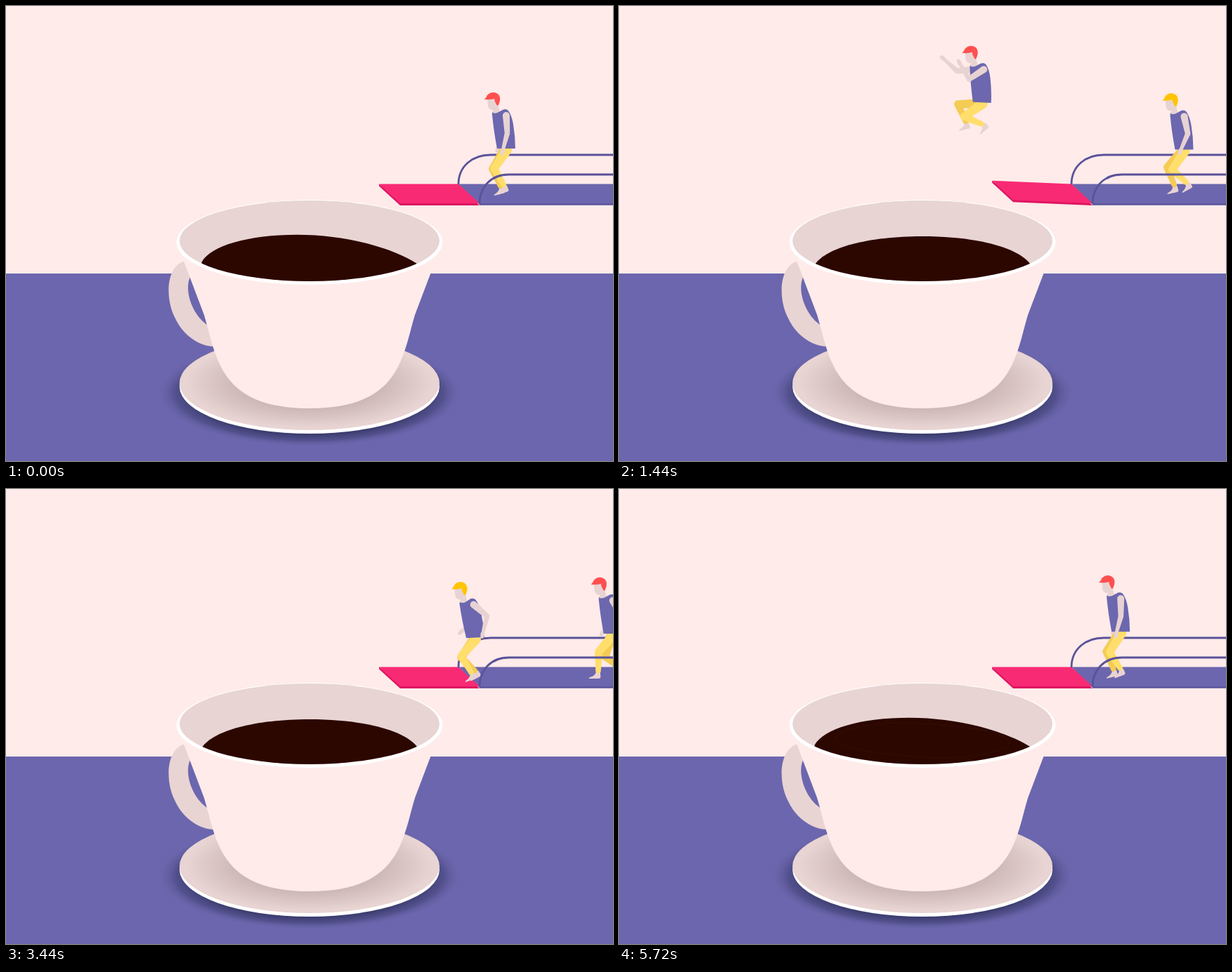
Recreate the animation shown at these times as an HTML page. Size 864 px wide and 648 px high, loop 5.76 s.

```html
<!DOCTYPE html>
<html lang="en">
<head>
<meta charset="utf-8">
<title>Coffee dive</title>
<style>
html, body { margin: 0; width: 100%; height: 100%; overflow: hidden; background: #feebea; }
svg { display: block; width: 100%; height: 100%; }
</style>
</head>
<body>
<svg viewBox="0 0 864 648" xmlns="http://www.w3.org/2000/svg">
  <defs>
    <radialGradient id="shade">
      <stop offset="0.78" stop-color="#3d3e70"/>
      <stop offset="0.88" stop-color="#4b4a83" stop-opacity="0.75"/>
      <stop offset="1" stop-color="#6c66ae" stop-opacity="0"/>
    </radialGradient>
    <radialGradient id="plate">
      <stop offset="0.55" stop-color="#cdb7b7"/>
      <stop offset="0.95" stop-color="#e8d4d3"/>
    </radialGradient>
    <clipPath id="inside"><ellipse cx="432" cy="334.5" rx="185" ry="57.5"/></clipPath>
    <clipPath id="dry"><rect width="864" height="379"/></clipPath>
  </defs>
  <rect width="864" height="648" fill="#feebea"/>
  <rect y="381" width="864" height="267" fill="#6c66ae"/>
  <ellipse cx="432" cy="551" rx="217" ry="77" fill="url(#shade)"/>
  <ellipse cx="432" cy="542" rx="185" ry="67" fill="#fff"/>
  <ellipse cx="432" cy="537" rx="185" ry="67" fill="url(#plate)"/>
  <g id="cup">
    <path fill="#e8d4d3" d="M256 363C228 368 226 415 240 443C252 470 275 484 296 485L288 455C266 442 253 406 262 386Z"/>
    <path fill="#feebea" d="M246 345L282 440C300 500 303 573 432 573C561 573 564 500 582 440L618 345Z"/>
    <ellipse cx="432" cy="336.5" rx="189.5" ry="60.5" fill="#fff"/>
    <ellipse cx="432" cy="334.5" rx="185" ry="57.5" fill="#e8d4d3"/>
    <g clip-path="url(#inside)">
      <path id="coffee" fill="#2c0700"/>
      <g id="rings" fill="none" stroke="#e8c4bc"></g>
    </g>
  </g>
  <path fill="#6c66ae" d="M644 253.5H864V283H674Z"/>
  <path fill="none" stroke="#5a5399" stroke-width="2.5" d="M674 282.5H864"/>
  <path id="boardEdge" fill="#df1562"/>
  <path id="board" fill="#f92a74"/>
  <path fill="none" stroke="#5a5399" stroke-width="2.8" d="M644 254C644 228 664 212 690 212H870"/>
  <g id="people" clip-path="url(#dry)"></g>
  <path fill="none" stroke="#5a5399" stroke-width="2.8" d="M674 282C674 258 690 240 716 240H870"/>
</svg>
<script>
const LOOP = 5760, HALF = LOOP / 2, SPLASH = 1840;
const SKIN = '#e8d3d3', SHIRT = '#6c67ae', NEAR = '#ffde6c', FAR = '#f4cc55';
const byId = id => document.getElementById(id);
const clamp = v => Math.max(0, Math.min(1, v));

function add(parent, tag, attrs) {
  const el = document.createElementNS('http://www.w3.org/2000/svg', tag);
  for (const k in attrs) el.setAttribute(k, attrs[k]);
  return parent.appendChild(el);
}

// Pose: hip x, y, lean, then x, y of near ankle, far ankle (from the hip),
// near hand, far hand (from the shoulder).
function walk(T) {
  const a = (T + 1680) / 1440 * 2 * Math.PI, c = Math.cos(a), s = Math.sin(a);
  return [815 - 0.0673 * (T + 1640), 206 + 1.2 * Math.cos(2 * a), 0,
    19 * c, 57 - 9 * Math.max(0, s), -19 * c, 54 - 9 * Math.max(0, -s),
    -13.5 * c, 52, 8 * c + 4, 49];
}

// Each row starts with its time.
const hop = [
  [-240, ...walk(-240)],
  [0, 709, 204, 0, 2, 55, -3, 57, -6, 54, 0, 50],
  [280, 690, 208, 1, -16, 55, 14, 53, 12, 50, -2, 48],
  [520, 669, 215, 2, -4, 51, 6, 47, 19, 46, -2, 42],
  [690, 651, 200, 6, 10, 58, 5, 59, -18, 42, -28, 32],
  [890, 613, 164, 0, 8, 48, -5, 46, -34, 18, -38, 12],
  [1100, 573, 208, 6, 4, 58, -8, 55, -12, 46, -34, 20]
];
const dive = [
  [1240, 564, 238, 15, 13, 53, -2, 46, -8, 51, -30, 20],
  [1300, 563, 245, 19, 13, 47, -2, 41, 16, 44, -4, 44],
  [1364, 550, 212, 6, 14, 60, 4, 58, -30, 5, -40, -5],
  [1440, 514, 139, -3, 7, 32, -18, 31, -36, -12, -47, -17],
  [1576, 479, 73, -2, 3, 36, -13, 35, -34, -10, -42, -14],
  [1800, 436, 253, -2, 4, 59, -4, 57, -14, 22, -16, 14],
  [1920, 432, 449, 0, 3, 59, -3, 58, -6, 44, -4, 44]
];
const moves = [...hop, ...dive];

const bendKeys = [[1090, 0], [1170, 27], [1240, 25], [1300, 31], [1345, 10], [1385, -12],
  [1440, -5], [1490, 5], [1545, -2], [1600, 0]];

function slope(keys, i, c) {
  const d = j => (keys[j + 1][c] - keys[j][c]) / (keys[j + 1][0] - keys[j][0]);
  if (i === 0) return d(0);
  if (i === keys.length - 1) return d(i - 1);
  const h0 = keys[i][0] - keys[i - 1][0], h1 = keys[i + 1][0] - keys[i][0];
  return (d(i - 1) * h1 + d(i) * h0) / (h0 + h1);
}

function sample(keys, t) {
  const last = keys.length - 1;
  if (t <= keys[0][0]) return keys[0].slice(1);
  if (t >= keys[last][0]) return keys[last].slice(1);
  let i = 0;
  while (keys[i + 1][0] <= t) i++;
  const a = keys[i], b = keys[i + 1], h = b[0] - a[0], u = (t - a[0]) / h, v = 1 - u;
  return a.slice(1).map((_, n) => {
    const c = n + 1;
    return v * v * (1 + 2 * u) * a[c] + u * u * (3 - 2 * u) * b[c]
      + h * u * v * (v * slope(keys, i, c) - u * slope(keys, i + 1, c));
  });
}

const plus = (p, x, y) => [p[0] + x, p[1] + y];
const mix = (p, q, k) => [p[0] + (q[0] - p[0]) * k, p[1] + (q[1] - p[1]) * k];

function turn([x, y], deg) {
  const r = deg * Math.PI / 180, c = Math.cos(r), s = Math.sin(r);
  return [x * c - y * s, x * s + y * c];
}

// Middle joint of a two-bone limb; side picks the way it bends.
function joint(a, b, l1, l2, side) {
  const dx = b[0] - a[0], dy = b[1] - a[1], len = Math.hypot(dx, dy) || 1;
  const d = Math.min(len, l1 + l2 - 0.1);
  const along = (d * d + l1 * l1 - l2 * l2) / (2 * d);
  const off = side * Math.sqrt(Math.max(0, l1 * l1 - along * along));
  return [a[0] + (dx * along - dy * off) / len, a[1] + (dy * along + dx * off) / len];
}

const dot = ([x, y], r) => `M${x - r} ${y}a${r} ${r} 0 1 0 ${2 * r} 0a${r} ${r} 0 1 0 ${-2 * r} 0Z`;

// Tapered bone with round ends.
function bone(a, b, wa, wb) {
  const dx = b[0] - a[0], dy = b[1] - a[1], len = Math.hypot(dx, dy) || 1;
  const nx = -dy / len / 2, ny = dx / len / 2;
  const q = [plus(a, nx * wa, ny * wa), plus(b, nx * wb, ny * wb),
    plus(b, -nx * wb, -ny * wb), plus(a, -nx * wa, -ny * wa)];
  return 'M' + q.map(p => p.join(' ')).join('L') + 'Z' + dot(a, wa / 2) + dot(b, wb / 2);
}

function makePerson(capColor, offset) {
  const g = add(byId('people'), 'g', {});
  const path = (fill, d = '') => add(g, 'path', { fill, d });
  const leg = color => ({
    shin: path(SKIN),
    foot: path(SKIN, 'M-3 -3L3 -3L3.5 4Q3 6.5 -1 6L-13 6Q-14 4.5 -10 3.5Q-5 2 -3 -3Z'),
    cloth: path(color)
  });
  const farArm = path(SKIN), farLeg = leg(FAR), nearLeg = leg(NEAR);
  const torso = path(SHIRT, 'M16 -1L-10 -1Q-15 -28 -17 -50Q-17 -55 -12 -54Q-8 -52 -4 -55Q2 -59 6 -55Q11 -48 13 -36Q16 -18 16 -1Z');
  const head = add(g, 'g', {});
  add(head, 'path', { fill: SKIN, d: 'M-15 -19L-14 -8Q-13 -3 -8 -2L-6 -2L-7 2Q-2 4 3 0L1 -7L2 -18Z' });
  add(head, 'path', { fill: capColor, d: 'M-19 -17Q-16 -20 -15 -23Q-8 -30 0 -25Q6 -20 1 -9Q-1 -7 -2 -10L-4 -14L-5 -18Q-11 -16 -19 -17Z' });
  return { g, farArm, farLeg, nearLeg, torso, head, nearArm: path(SKIN), offset };
}

function drawLeg(leg, hip, ankle) {
  const knee = joint(hip, ankle, 32, 32, 1);
  const tilt = Math.atan2(ankle[0] - knee[0], ankle[1] - knee[1]) * 180 / Math.PI;
  leg.shin.setAttribute('d', bone(knee, ankle, 7, 5));
  leg.cloth.setAttribute('d', bone(hip, knee, 14, 11) + bone(knee, mix(knee, ankle, 0.84), 11, 7.5));
  leg.foot.setAttribute('transform', `translate(${ankle}) rotate(${-0.6 * Math.max(0, tilt)})`);
}

function drawArm(arm, shoulder, hand) {
  const elbow = joint(shoulder, hand, 25, 30, -1);
  arm.setAttribute('d', bone(shoulder, elbow, 10, 7.5) + bone(elbow, mix(elbow, hand, 0.85), 7.5, 4.5)
    + bone(mix(elbow, hand, 0.87), hand, 6, 5));
}

function drawPerson(p, t) {
  const tau = (t + p.offset) % LOOP, T = tau > 2400 ? tau - LOOP : tau;
  const shown = T < 2060;
  p.g.setAttribute('display', shown ? 'inline' : 'none');
  if (!shown) return;
  const [x, y0, lean, nx, ny, fx, fy, hx, hy, gx, gy] = T < -240 ? walk(T) : sample(moves, T);
  const hip = [x, y0 + Math.max(0, T - 1920) * 0.3];
  const at = (px, py) => plus(hip, ...turn([px, py], -lean));
  const near = at(3, -48), far = at(-10, -48);
  drawArm(p.farArm, far, plus(far, gx, gy));
  drawLeg(p.farLeg, at(1, 1), plus(hip, fx, fy));
  drawLeg(p.nearLeg, at(4, 1), plus(hip, nx, ny));
  p.torso.setAttribute('transform', `translate(${hip}) rotate(${-lean})`);
  p.head.setAttribute('transform', `translate(${at(-9, -54)})`);
  drawArm(p.nearArm, near, plus(near, hx, hy));
  p.g.setAttribute('opacity', T < SPLASH ? 1 : T < 1920 ? 1 - (T - SPLASH) / 320 : 0.75 * (2060 - T) / 140);
}

function drawBoard(w) {
  const angle = Math.asin(sample(bendKeys, w)[0] / 113);
  const dx = -113 * Math.cos(angle), dy = 113 * Math.sin(angle);
  const shape = drop => `M644 ${253.5 + drop}L${644 + dx} ${253.5 + drop + dy}L${674 + dx} ${281 + drop + dy}L674 ${281 + drop}Z`;
  byId('board').setAttribute('d', shape(0));
  byId('boardEdge').setAttribute('d', shape(3)
    + `M${644 + dx} ${253.5 + dy}v3L${674 + dx} ${284 + dy}v-3Z`);
}

function drawCoffee(slosh) {
  const s = Math.abs(slosh), flip = v => slosh < 0 ? 864 - v : v;
  const pt = (x, y) => flip(x) + ' ' + y;
  byId('coffee').setAttribute('d', `M${pt(279 - 3 * s, 368 - 15 * s)}`
    + `C${pt(295 - 19 * s, 344 - 14 * s)} ${pt(355 - 45 * s, 328 - 11 * s)} ${pt(432 - 90 * s, 328 - 11 * s)}`
    + `C${pt(509 - 90 * s, 328 - 11 * s)} ${pt(568 - 58 * s, 344 + 20 * s)} ${pt(585, 367)}`
    + `L${pt(585, 400)}L${pt(279, 400)}L${pt(279, 370)}Z`);
}

const rings = [0, 1, 2].map(() => add(byId('rings'), 'path', {}));

function drawRing(el, r, opacity, slosh, settle) {
  const visible = opacity > 0.005 && r > 1;
  el.setAttribute('opacity', visible ? opacity : 0);
  if (!visible) return;
  const pull = settle * clamp(1.2 - r / 110);
  const cx = 432 - 18 * pull, cy = 358 + 18 * pull, ry = r < 21 ? r * 0.36 : 7.5 + (r - 21) * 0.16;
  const pts = [];
  for (let i = 0; i < 48; i++) {
    const a = i / 24 * Math.PI, x = cx + r * Math.cos(a), d = x - 432;
    const y = cy + ry * Math.sin(a) + slosh * (0.14 * d + 4 * Math.sin(d / 30));
    pts.push(x.toFixed(1) + ' ' + y.toFixed(1));
  }
  el.setAttribute('d', 'M' + pts.join('L') + 'Z');
}

function drawCup(w) {
  const u = (w - SPLASH + HALF) % HALF, v = u - 80;
  const rise = u < 80 ? Math.sin(u / 80 * Math.PI / 2) : 1;
  const swing = (period, decay) => v < 0 ? rise : Math.cos(2 * Math.PI * v / period) * Math.exp(-v / decay);
  const slosh = swing(940, 600) * clamp((1500 - u) / 400);
  const tilt = -1.58 * swing(420, 150) * clamp((580 - u) / 150);
  byId('cup').setAttribute('transform', `rotate(${tilt} 432 572)`);
  drawCoffee(slosh);
  const fade = 0.27 * clamp((1030 - u) / 260), settle = Math.exp(-Math.max(0, v) / 200);
  drawRing(rings[0], 110 * rise + 0.11 * Math.max(0, v), fade * clamp((500 - u) / 250), slosh, settle);
  drawRing(rings[1], 11 + 0.1125 * u, fade, slosh, settle);
  drawRing(rings[2], 21 + 0.11 * (u - 800), u > 620 ? fade * clamp((960 - u) / 120) : 0, slosh, settle);
}

const people = [makePerson('#ff4f4f', 0), makePerson('#ffc400', HALF)];

function render(t) {
  drawCup(t % HALF);
  drawBoard(t % HALF);
  people.forEach(p => drawPerson(p, t));
}

const start = performance.now();
function tick(now) {
  render(Math.max(0, now - start) % LOOP);
  requestAnimationFrame(tick);
}
render(0);
requestAnimationFrame(tick);
</script>
</body>
</html>
```
